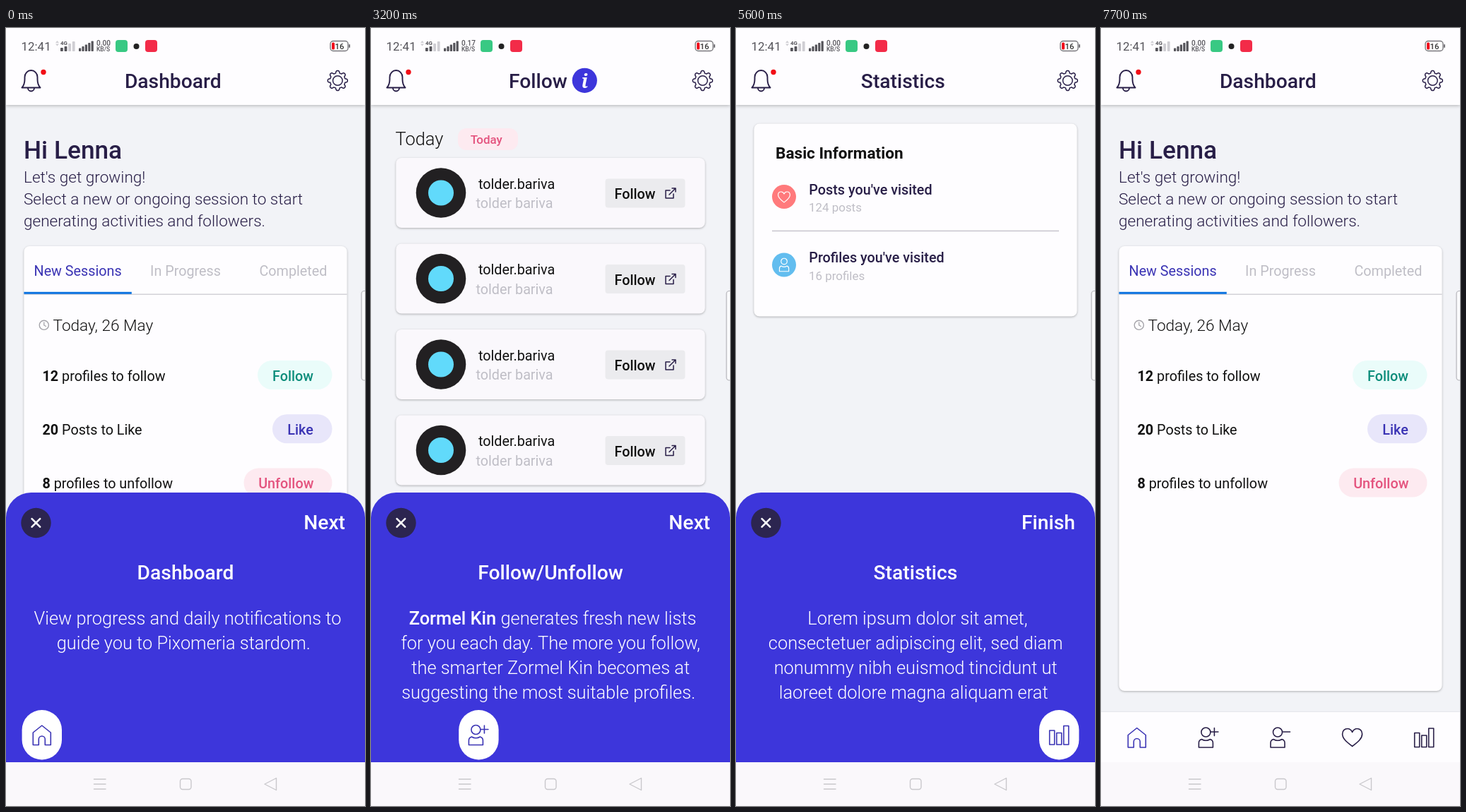
These frames come from a looping animation (508x1102 px, 8000 ms). An HTML page:

```html
<!DOCTYPE html>
<html lang="en">
<head>
<meta charset="utf-8">
<title>App tour</title>
<style>
  html, body { margin: 0; width: 100%; height: 100%; overflow: hidden; background: #f2f3f7; }
  svg { display: block; font-family: Roboto, sans-serif; }
  .card { filter: drop-shadow(0 1px 1.5px rgba(0, 0, 0, .28)); }
  .bar { filter: drop-shadow(0 1px 2.5px rgba(0, 0, 0, .28)); }
  .line { fill: none; stroke-linecap: round; stroke-linejoin: round; }
</style>
</head>
<body>
<svg id="stage" width="508" height="1102" viewBox="0 0 508 1102"></svg>
<script>
const INK = '#281e47', BLUE = '#3d36db', ICON = '#3a33b4', PALE = '#bfbec6', COAL = '#222022', CYAN = '#61dafb';
const DP = 508 / 360;
const LOOP = 8000;

// Text sizes are in dp, positions in pixels.
const text = (x, y, s, dp, weight = 400, fill = '#111', anchor = 'start') =>
  `<text x="${x}" y="${y}" font-size="${(dp * DP).toFixed(2)}" font-weight="${weight}" fill="${fill}" text-anchor="${anchor}">${s}</text>`;
const mid = (x, y, s, dp, weight, fill) => text(x, y, s, dp, weight, fill, 'middle');
const rect = (x, y, w, h, r, fill, extra = '') =>
  `<rect x="${x}" y="${y}" width="${w}" height="${h}" rx="${r}" fill="${fill}" ${extra}/>`;
const circle = (x, y, r, fill, extra = '') => `<circle cx="${x}" cy="${y}" r="${r}" fill="${fill}" ${extra}/>`;
const line = (d, color, width = 1.6, extra = '') =>
  `<path class="line" d="${d}" stroke="${color}" stroke-width="${width}" ${extra}/>`;
const card = (x, y, w, h, fill = '#fefdff') => rect(x, y, w, h, 8, fill, 'class="card"');
const span = (s, weight) => `<tspan font-weight="${weight}">${s}</tspan>`;

const person = 'M-4-14a6.5 6.5 0 0 1 0 13a6.5 6.5 0 0 1 0-13M-14 14V8a5.5 5.5 0 0 1 4-5.5Q-4 6 2 2.5A5.5 5.5 0 0 1 6 8V14Z';
const icons = {
  home: 'M-4.5 14V6a4.5 4.5 0 0 1 9 0V14H12.5V-3.5L0-13.5L-12.5-3.5V14Z',
  follow: person + 'M2.5-8H13.5M8-13.5V-2.5',
  unfollow: person + 'M2.5-8H13.5',
  heart: 'M0 12.5C-7 7-14 2-14-5C-14-10-10.5-12.5-7-12.5C-3.5-12.5-1-10 0-7.5C1-10 3.5-12.5 7-12.5C10.5-12.5 14-10 14-5C14 2 7 7 0 12.5Z',
  bars: 'M-13.5-6.5h7v20h-7ZM-3.5-3h7v16.5h-7ZM6.5-13h7v26.5h-7Z'
};
const icon = (name, x, y, color, scale = 1, width = 1.6) =>
  line(icons[name], color, width / scale, `transform="translate(${x} ${y}) scale(${scale})"`);
const external = (x, y, color) =>
  line(`M${x - 1} ${y - 4}H${x - 7}V${y + 7}H${x + 4}V${y + 1}M${x - 2} ${y + 2}L${x + 7} ${y - 7}M${x + 2} ${y - 7}H${x + 7}V${y - 2}`, color, 1.5);
const tabX = i => 50.8 + 101.6 * i;

function gear(cx, cy) {
  let d = '';
  for (let i = 0; i < 72; i++) {
    const a = i / 72 * Math.PI * 2;
    const r = 12.4 + Math.max(-1, Math.min(1, 2.2 * Math.cos(8 * a))) * 1.6;
    d += `${i ? 'L' : 'M'}${(cx + r * Math.cos(a)).toFixed(1)} ${(cy + r * Math.sin(a)).toFixed(1)}`;
  }
  return line(d + 'Z', INK, 1.5) + circle(cx, cy, 6.8, 'none', `stroke="${INK}" stroke-width="1.5"`);
}

function statusBar() {
  const gray = '#55545a';
  let s = text(21.5, 32, '12:41', 12, 400, gray);
  s += '<path id="arrows" d="M70 21l2.5-3 2.5 3ZM70 22.5l2.5 3 2.5-3Z"/>';
  s += text(77, 24, '4G', 5.6, 700, gray);
  [5, 7, 11, 14].forEach((h, i) => s += rect(77 + i * 5.6, 33 - h, 3.8, h, .8, i < 2 ? gray : '#cfced3'));
  for (let i = 0; i < 5; i++) s += rect(103 + i * 4.4, 28.5 - i * 2.5, 3.2, 4.5 + i * 2.5, .8, gray);
  s += `<g id="speed">${text(128, 24.5, '0.00', 7.1, 500, gray)}</g>` + text(128, 33, 'KB/S', 6, 500, gray);
  s += rect(155, 17, 17, 17, 4, '#38c983') + circle(184.5, 26, 4, '#222') + rect(197, 17, 17, 17, 4, '#f32b48');
  s += rect(459, 18.5, 25, 14, 4, '#fff', 'stroke="#77767b" stroke-width="1.4"') + rect(485, 23, 2, 5, 1, '#77767b');
  return s + rect(461, 20.5, 4, 10, 1.5, '#f00d1c') + mid(472, 30, '16', 8, 500, '#333');
}

function header(title, infoX) {
  let s = rect(0, 0, 508, 109, 0, '#fefdff', 'class="bar"');
  s += line('M22.5 84.5Q26.5 80 26.5 72.5V69.5a9 9.5 0 0 1 18 0V72.5Q44.5 80 48.5 84.5ZM31 85a4.5 4.5 0 0 0 9 0', INK, 1.9);
  s += circle(53, 62.5, 3.7, '#f20d16') + gear(469.3, 74.5);
  s += mid(236.3, 85, title, 20, 500, INK);
  if (!infoX) return s;
  return s + circle(infoX, 74.3, 17.6, BLUE) +
    `<text x="${infoX}" y="84.5" font-family="'Noto Serif', serif" font-size="27" font-weight="700" font-style="italic" fill="#fff" text-anchor="middle">i</text>`;
}

function panel(title, button, pillIndex, pillIcon, lines) {
  let s = `<path d="M0 1040V693.5A35.5 35.5 0 0 1 35.5 658H472.5A35.5 35.5 0 0 1 508 693.5V1040Z" fill="${BLUE}"/>`;
  s += circle(42.5, 701, 21.2, '#2c2550') + line('M36.6 695.1l11.6 11.6M48.2 695.1l-11.6 11.6', '#fff', 2.6);
  s += text(480, 710, button, 20, 500, '#fff', 'end') + mid(254, 780.5, title, 20, 500, '#fff');
  lines.forEach((l, i) => {
    const x = i === 0 ? 257 : i === lines.length - 1 ? 251.2 : 254.2;
    s += mid(x, 844.5 + 35.3 * i, l, 18, 300, '#fff');
  });
  const x = tabX(pillIndex);
  return s + rect(x - 28.2, 966, 56.4, 70.5, 28.2, '#fff') + icon(pillIcon, x, 1001.5, ICON);
}

function dashboard() {
  let s = text(25, 185, 'Hi Lenna', 25, 500, INK);
  ["Let's get growing!", 'Select a new or ongoing session to start', 'generating activities and followers.']
    .forEach((l, i) => s += text(25, 219 + 31 * i, l, 16, 300, INK));
  s += card(25.4, 309, 457.2, 630);
  s += rect(25.4, 376.5, 457.2, 1.5, 0, '#d3d2d8') + rect(25.4, 373.8, 152.4, 3, 0, '#0c73e0');
  ['New Sessions', 'In Progress', 'Completed']
    .forEach((l, i) => s += mid(101.6 + 152.4 * i, 351, l, 14, 400, i ? PALE : ICON));
  s += circle(53.8, 420.8, 6.6, 'none', 'stroke="#a4a3a9" stroke-width="1.4"') + line('M53.8 417V421L56.5 422.5', '#a4a3a9', 1.3);
  s += text(66.5, 429, 'Today, 26 May', 16, 300);
  [['12', 'profiles to follow', 'Follow', 356, '#eafcfa', '#0c8d7b'],
   ['20', 'Posts to Like', 'Like', 377, '#e8e6fa', ICON],
   ['8', 'profiles to unfollow', 'Unfollow', 336.5, '#fdeaf0', '#e4537e']]
    .forEach(([n, what, label, x, bg, fg], i) => {
      const y = 491.5 + 76.3 * i;
      s += text(51.5, y + 8, `${span(n, 700)} ${what}`, 14);
      s += rect(x, y - 20.5, 461.5 - x, 41, 20.5, bg) + mid((x + 456) / 2, y + 8, label, 14, 500, fg);
    });
  return s;
}

const today = text(34.5, 166, 'Today', 18, 300);
const profile = y => circle(99, y, 35.3, COAL) + circle(99, y, 18, CYAN) + text(152, y - 5.7, 'tolder.bariva', 14);

function followList() {
  let s = today + rect(123, 142, 85, 31, 12, '#fdeaf0') + mid(163.3, 164, 'Today', 12, 500, '#e4537e');
  for (let i = 0; i < 4; i++) {
    s += `<g transform="translate(0 ${121.5 * i})">` + card(35.3, 184, 437.4, 99, '#faf8fc') + profile(233.5) +
      text(148.5, 255, 'tolder bariva', 14, 400, PALE) +
      rect(331.5, 213.5, 113, 41, 4, '#ebebee') + text(344.5, 242, 'Follow', 14, 500) + external(424, 234, INK) + '</g>';
  }
  return s;
}

function posts() {
  const photo = y => `<path d="M35.3 ${y + 254}V${y + 8}a8 8 0 0 1 8-8H464.7a8 8 0 0 1 8 8V${y + 254}Z" fill="${COAL}"/>`;
  let s = today + rect(123, 141.5, 71, 31.5, 14, '#fd0202') + mid(158, 164, 'New', 12, 500, '#fff');
  s += card(35.3, 187.4, 437.4, 444.6, '#faf8fc') + photo(187.4) + photo(653.5) + circle(254.5, 311.5, 64, CYAN);
  s += rect(423, 208, 24, 24, 2, '#fff') + line('M450.5 212V235.5H427', '#fff', 2);
  s += profile(490.7) + text(152, 512, 'tolder bariva', 14, 400, PALE);
  s += rect(317.5, 470.5, 127, 41, 4, BLUE) + text(329, 498.5, 'Like', 14, 500, '#fff') + external(425.5, 491.5, '#fff');
  s += rect(35.3, 540.5, 437.4, 1.3, 0, '#e3e2e8');
  return s + text(56, 580, 'Ponte guapa para ser testigo de una', 16, 400, INK) + text(56, 611.5, 'entrega tan especial de amor', 16, 400, INK);
}

function statistics() {
  let s = card(25.4, 135.5, 457.2, 273) + text(56, 185, 'Basic Information', 16, 700);
  s += circle(68, 239, 17, '#ff7a7c') + icon('heart', 68, 239.5, '#fff', .6, 1.2);
  s += text(103.3, 235.5, "Posts you've visited", 14, 500, INK) + text(103, 260, '124 posts', 12, 400, PALE);
  s += rect(51, 286.7, 406, 1.5, 0, '#c6c4cd');
  s += circle(68, 335.5, 17, '#62bdef') + line(person, '#fff', 1.8, 'transform="translate(70.7 335.5) scale(.66)"');
  return s + text(103.3, 332, "Profiles you've visited", 14, 500, INK) + text(103, 356.5, '16 profiles', 12, 400, PALE);
}

const tabs = () => rect(0, 969, 508, 71, 0, '#fefdff', 'class="card"') +
  ['home', 'follow', 'unfollow', 'heart', 'bars'].map((n, i) => icon(n, tabX(i), 1005, i ? INK : ICON)).join('');

const systemBar = () => rect(0, 1040, 508, 62, 0, '#faf8fb') +
  line('M124.5 1064H141M124.5 1071H141M124.5 1078H141', '#c9c8cc', 1.4) +
  rect(246.5, 1063.5, 15.5, 15, 3.5, 'none', 'stroke="#c9c8cc" stroke-width="1.4"') +
  line('M366 1071L382.5 1062.5V1079.5Z', '#c9c8cc', 1.4);

const home = header('Dashboard') + dashboard();
const scenes = [
  [0, home + panel('Dashboard', 'Next', 0, 'home',
    ['View progress and daily notifications to', 'guide you to Pixomeria stardom.'])],
  [1700, header('Follow', 302.3) + followList() + panel('Follow/Unfollow', 'Next', 1, 'follow',
    [span('Zormel Kin', 500) + ' generates fresh new lists', 'for you each day. The more you follow,',
     'the smarter Zormel Kin becomes at', 'suggesting the most suitable profiles.'])],
  [3600, header('Posts to Like', 342.5) + posts() + panel('Posts to Like', 'Next', 3, 'heart',
    ['Engaging with content is the best', 'way to make a new friend. ' + span('Zormel Kin', 500),
     'presents your daily dose of posts to like or', 'comment on right here.'])],
  [5300, header('Statistics') + statistics() + panel('Statistics', 'Finish', 4, 'bars',
    ['Lorem ipsum dolor sit amet,', 'consectetuer adipiscing elit, sed diam',
     'nonummy nibh euismod tincidunt ut', 'laoreet dolore magna aliquam erat'])],
  [7200, home + tabs()]
];

const stage = document.getElementById('stage');
stage.innerHTML = rect(0, 0, 508, 1102, 0, '#f2f3f7') +
  scenes.map(([, body]) => `<g class="scene">${body}</g>`).join('') +
  rect(503, 372.5, 12, 126.5, 4, '#fafafc', 'stroke="#b5b4ba" stroke-width="1.2"') + statusBar() + systemBar();

const groups = [...stage.querySelectorAll('.scene')];
const speed = stage.querySelector('#speed text');
const arrows = stage.querySelector('#arrows');

function draw() {
  const t = performance.now() % LOOP;
  const current = scenes.findLastIndex(([start]) => t >= start);
  groups.forEach((g, i) => g.style.display = i === current ? '' : 'none');
  speed.textContent = t >= 900 && t < 4500 ? '0.17' : '0.00';
  arrows.setAttribute('fill', t >= 1100 && t < 2500 ? '#55545a' : '#cfced3');
  requestAnimationFrame(draw);
}
draw();
</script>
</body>
</html>
```
